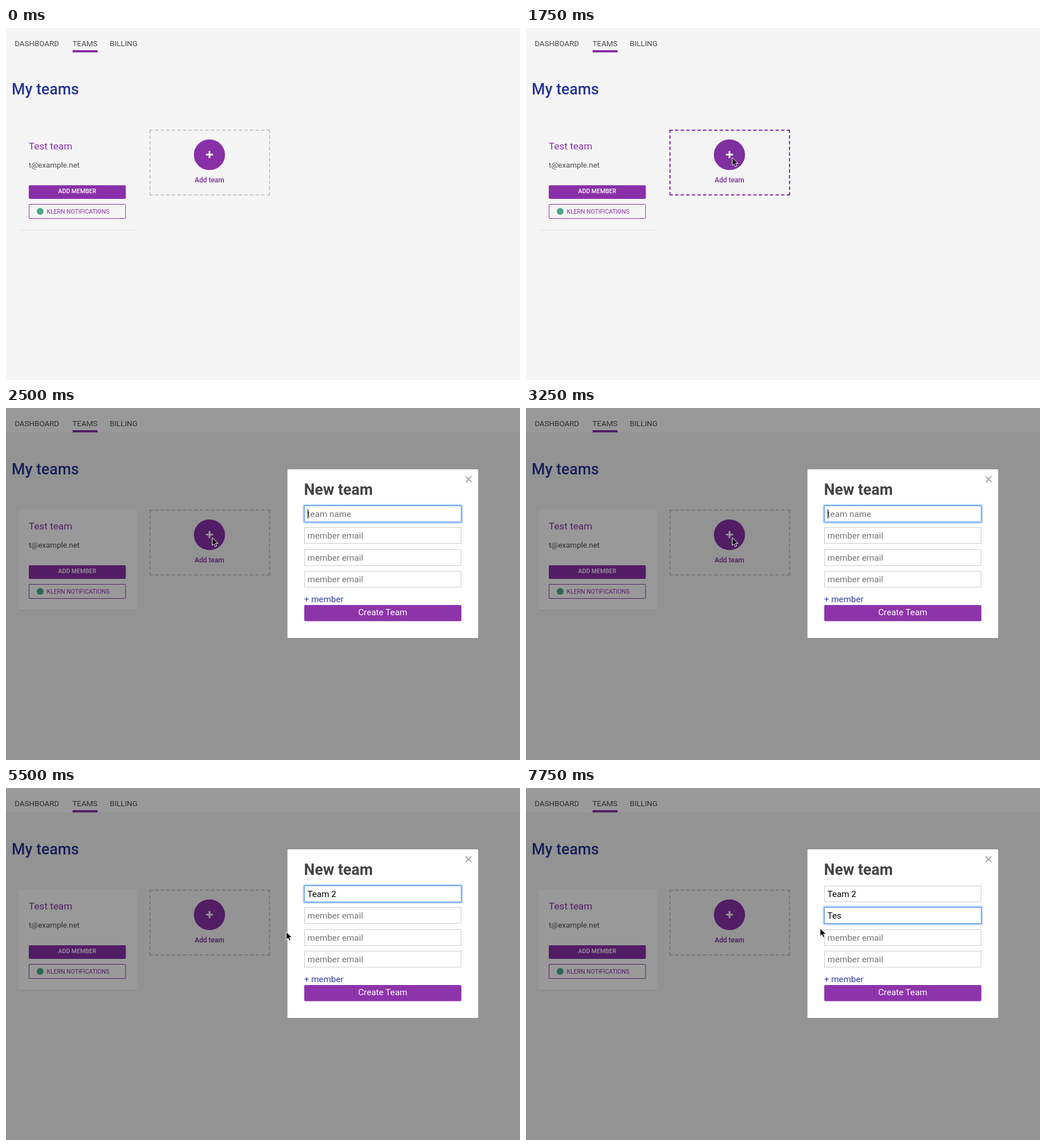
An HTML page that plays this animation: 903 by 620 pixels, repeating every 8 s.

```html
<!DOCTYPE html>
<html lang="en">
<head>
<meta charset="utf-8">
<title>My teams</title>
<style>
  html, body { margin: 0; width: 100%; height: 100%; overflow: hidden; background: #f5f5f5; }
  svg { display: block; width: 903px; height: 620px; font-family: Roboto, sans-serif; white-space: pre; }
  .nav { font-size: 13.4px; fill: #4a4a4a; }
  .medium { font-weight: 500; }
  .small { font-size: 10.5px; }
  .purple { fill: #8930a8; }
  .form { font-size: 15.3px; }
  .ring { fill: none; stroke: #5a9df5; }
</style>
</head>
<body>
<svg viewBox="0 0 903 620">
  <rect width="903" height="620" fill="#f5f5f5"/>
  <path d="M24 356.3H231" stroke="#e6e8e9" stroke-width="1.6"/>
  <g id="panels" fill="#fff">
    <rect width="903" height="43"/>
    <rect x="22.5" y="179" width="208" height="176"/>
  </g>

  <g class="nav">
    <text x="15.2" y="31.5">DASHBOARD</text>
    <text x="116.8" y="31.5">TEAMS</text>
    <text x="182.3" y="31.5">BILLING</text>
    <text x="40" y="245.5">t@example.net</text>
  </g>
  <rect class="purple" x="117" y="39" width="44" height="4"/>
  <text class="medium" x="10" y="116.5" font-size="26.8" fill="#283593">My teams</text>

  <text class="purple" x="40" y="214" font-size="17.2">Test team</text>
  <rect class="purple" x="40" y="277" width="170.5" height="24" rx="2"/>
  <text class="small medium" x="125.2" y="291.3" text-anchor="middle" fill="#fff">ADD MEMBER</text>
  <rect x="40.5" y="310.5" width="169.5" height="25" rx="1.5" fill="none" stroke="#8930a8"/>
  <circle cx="60" cy="323" r="6" fill="#4aa88a"/>
  <text class="small purple" x="71.6" y="326.8">KLERN NOTIFICATIONS</text>

  <g id="addBox" fill="none" stroke-width="2">
    <rect id="addFill" x="252" y="179" width="212" height="116" stroke="none"/>
    <path d="M252 180H464M252 294H464" stroke-dasharray="6 3.81"/>
    <path d="M253 179V295M463 179V295" stroke-dasharray="6 4"/>
  </g>
  <ellipse id="addDisc" cx="357.4" cy="223.3" rx="27.4" ry="27"/>
  <path d="M351.3 223H363.7M357.5 216.8V229.2" stroke="#f5f5f5" stroke-width="3.2"/>
  <text class="medium" x="357.5" y="271.5" font-size="12" text-anchor="middle" fill="#7d2d9e">Add team</text>

  <g id="modal">
    <rect width="903" height="620" opacity=".4"/>
    <rect x="494.5" y="108" width="335" height="297" fill="#fff"/>
    <path d="M807.5 120.5L817.5 130.5M817.5 120.5L807.5 130.5" stroke="#b0b0b0" stroke-width="2.3"/>
    <text x="523.5" y="153" font-size="26.8" font-weight="700" fill="#444">New team</text>
    <g id="fields" class="form"></g>
    <g id="focus" class="ring">
      <rect x="522.5" y="170.5" width="279" height="32" rx="2.5" stroke-width="3" opacity=".3"/>
      <rect x="524" y="172" width="276" height="29" rx="1" stroke-width="2" opacity=".75"/>
    </g>
    <rect id="caret" y="178" width="1" height="17"/>
    <text class="form" x="523.7" y="341.5" fill="#303f9f">+ member</text>
    <rect x="524" y="347" width="276" height="28.5" rx="2" fill="#8e34ab"/>
    <text class="form" x="661.8" y="365" text-anchor="middle" fill="#fff">Create Team</text>
  </g>

  <path id="cursor" d="M.8 .8V14.6L4 11.7L6.2 16.8L8.7 15.7L6.6 10.8H11Z" stroke="#fff"/>
</svg>
<script>
const LOOP = 8000, TEXT_X = 529.6, ROW = 38.3;
const $ = id => document.getElementById(id);
const set = (el, attrs) => { for (const k in attrs) el.setAttribute(k, attrs[k]); };
const show = (el, on) => set(el, { visibility: on ? 'visible' : 'hidden' });

// Each list holds [start, value...]; the last entry already started applies.
const pointer = [[1250, 454, 228], [1500, 383, 219], [1750, 361.5, 227.5], [5250, 431, 234],
                 [5500, 491.5, 252.5], [6000, 510, 251], [6250, 516, 246.5]];
const teamName = [[0, ''], [3750, 'T'], [4250, 'Te'], [4500, 'Tea'], [4750, 'Team'], [5000, 'Team 2']];
const email = [[0, ''], [6750, 'T'], [7250, 'Tes']];
const caretOn = [[0, 0], [2250, 1], [2750, 0], [3250, 1], [5500, 0], [5750, 1], [6250, 0], [6750, 1], [7750, 0]];
const fade = [[0, 0], [2250, .5], [2500, 1]];
const at = (list, t) => list.findLast(step => step[0] <= t);

const add = (tag, attrs) => {
  const el = document.createElementNS('http://www.w3.org/2000/svg', tag);
  set(el, attrs);
  return $('fields').appendChild(el);
};
const fields = ['team name', 'member email', 'member email', 'member email'].map((hint, i) => {
  const y = i * ROW;
  add('rect', { x: 524.5, y: 172.5 + Math.round(y), width: 275, height: 28, fill: '#fff', stroke: '#ccc' });
  return { hint, text: add('text', { x: TEXT_X, y: 192 + y }) };
});

function fill({ hint, text }, value) {
  text.textContent = value || hint;
  set(text, { fill: value ? '#000' : '#757575' });
}

function draw(t) {
  const opacity = at(fade, t)[1], hover = t >= 1500 && t < 2250;
  show($('panels'), opacity);
  show($('modal'), opacity);
  set($('modal'), { opacity });
  set($('addBox'), { stroke: hover ? '#8930a8' : '#c8c8c8' });
  set($('addFill'), { fill: hover ? '#f3f3f3' : 'none' });
  set($('addDisc'), { fill: hover ? '#7f2fa0' : '#8930a8' });

  const values = [at(teamName, t)[1], at(email, t)[1], '', ''];
  fields.forEach((field, i) => fill(field, values[i]));
  const active = t < 5750 ? 0 : 1;
  const shift = `translate(0 ${Math.round(active * ROW)})`;
  const typed = values[active] ? fields[active].text.getComputedTextLength() : 0;
  set($('focus'), { transform: shift });
  set($('caret'), { transform: shift, x: Math.round(TEXT_X + typed), opacity: at(caretOn, t)[1] });

  const pos = at(pointer, t);
  show($('cursor'), pos);
  if (pos) set($('cursor'), { transform: `translate(${pos[1]} ${pos[2]})` });
}

const start = performance.now();
function tick() {
  draw((performance.now() - start) % LOOP);
  requestAnimationFrame(tick);
}
tick();
</script>
</body>
</html>
```
